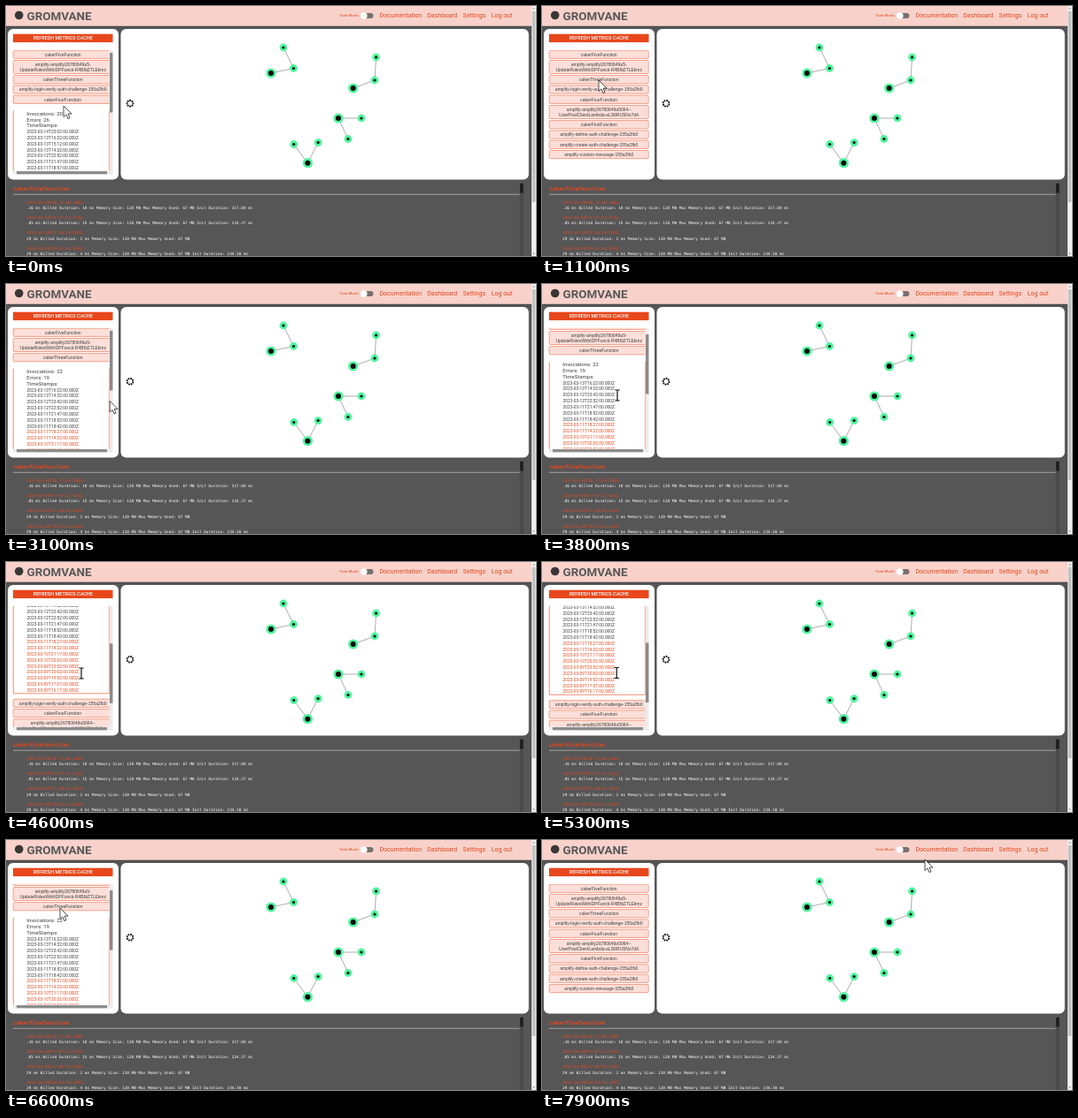
An HTML page for the animation above (8 s loop, 598 by 283 pixels).

```html
<!DOCTYPE html>
<html lang="en">
<head>
<meta charset="utf-8">
<title>Function metrics dashboard</title>
<style>
  html, body { margin: 0; width: 100%; height: 100%; overflow: hidden; background: #565657; }
  svg { display: block; width: 598px; height: 283px; font-family: Roboto, Arial, sans-serif; }
  text { white-space: pre; }
  .mono { font-family: "DejaVu Sans Mono", monospace; }
  .label { font-family: "Liberation Sans", Arial, sans-serif; }
</style>
</head>
<body>
<svg id="stage" viewBox="0 0 598 283"></svg>
<script>
const LOOP = 8000, STEP = 100;
const ORANGE = '#e8471b', INK = '#3c3c3e', GRAY = '#565657';
const stage = document.getElementById('stage');

function add(parent, tag, attrs = {}, content) {
  const node = document.createElementNS('http://www.w3.org/2000/svg', tag);
  for (const key in attrs) node.setAttribute(key, attrs[key]);
  if (content !== undefined) node.textContent = content;
  parent.appendChild(node);
  return node;
}
const rect = (parent, x, y, width, height, fill, more) =>
  add(parent, 'rect', { x, y, width, height, fill, ...more });
const circle = (parent, cx, cy, r, fill) => add(parent, 'circle', { cx, cy, r, fill });
const text = (parent, x, y, size, fill, content, more) =>
  add(parent, 'text', { x, y, 'font-size': size, fill, ...more }, content);
const line = (parent, x1, y1, x2, y2, stroke, width) =>
  add(parent, 'line', { x1, y1, x2, y2, stroke, 'stroke-width': width });
const centered = { 'text-anchor': 'middle' };

function drawHeader() {
  rect(stage, 0, 0, 593, 283, GRAY);
  rect(stage, 0, 22.5, 593, 1.5, '#47474a');
  rect(stage, 0, 0, 593, 22.7, '#f8d2ca');
  circle(stage, 14.7, 10.5, 4.8, '#3a3636');
  text(stage, 23.6, 16.3, 13.4, '#58585a', 'GROMVANE', { 'font-weight': 700 });
  text(stage, 376.5, 12.4, 4.4, ORANGE, 'Dark Mode');
  rect(stage, 401, 8, 13.5, 6, '#77706f', { rx: 3 });
  circle(stage, 403.8, 11, 3.8, '#fff');
  const links = [['Documentation', 445.3], ['Dashboard', 492.2], ['Settings', 528.3], ['Log out', 559.5]];
  for (const [name, x] of links) text(stage, x, 13.2, 7, ORANGE, name, centered);

  rect(stage, 593, 0, 5, 283, '#f1f1f1');
  rect(stage, 593.7, 6, 3.6, 216, '#c1c1c1');
  add(stage, 'path', { d: 'M594.3 3.6L595.5 2L596.7 3.6ZM594.3 279.4L595.5 281L596.7 279.4Z', fill: '#707070' });
}

function drawGraph() {
  rect(stage, 129.5, 26, 460.3, 170.5, '#fff', { rx: 6 });
  // each group: main node, then satellites; the link hub is the node at index hub
  const groups = [
    { hub: 1, at: [[299, 76], [324.5, 70.5], [313, 47]] },
    { hub: 1, at: [[391.7, 93], [416, 84], [417.6, 58]] },
    { hub: 0, at: [[375, 127], [401, 127], [386, 150.5]] },
    { hub: 0, at: [[340.4, 177.7], [324.8, 156.5], [352.2, 154.6]] }
  ];
  for (const { hub, at } of groups) {
    for (const p of at) line(stage, ...at[hub], ...p, '#a3a3a3', 0.9);
    at.forEach(([x, y], i) => {
      circle(stage, x, y, i ? 4.4 : 5.6, '#4ff59c');
      circle(stage, x, y, i ? 1.6 : 3, '#0a0a0a');
    });
  }
  const ring = add(stage, 'g');
  for (let i = 0; i < 8; i++) {
    const a = i * Math.PI / 4;
    circle(ring, 3.4 * Math.cos(a), 3.4 * Math.sin(a), 1.1, '#1c1c1c');
  }
  return ring;
}

function drawLog() {
  const mono = { class: 'mono' };
  text(stage, 8, 208.5, 6.2, ORANGE, 'cakerFiveFunction',
    { ...mono, 'font-weight': 700, 'font-style': 'italic' });
  line(stage, 8, 213.3, 580, 213.3, '#b5b5b5', 0.8);
  rect(stage, 579.7, 200, 4.2, 83, '#4b4b4d');
  rect(stage, 580, 201, 3.6, 10.5, '#1f1f20');
  const size = 'Memory Size: 128 MB Max Memory Used: 67 MB';
  const rows = [
    ['16:17:08.188', '.16 ms Billed Duration: 10 ms', ' Init Duration: 317.80 ms'],
    ['17:07:57.421', '.85 ms Billed Duration: 15 ms', ' Init Duration: 224.37 ms'],
    ['17:08:29.283', '29 ms Billed Duration: 2 ms', ''],
    ['19:52:34.495', '29 ms Billed Duration: 4 ms', ' Init Duration: 234.38 ms']
  ];
  rows.forEach(([time, billed, init], i) => {
    const y = 224 + i * 17.2;
    text(stage, 23, y, 4.38, ORANGE, `2023-03-09T${time}Z:`, mono);
    text(stage, 23, y + 6.1, 4.38, '#fff', `${billed} ${size}${init}`, mono);
  });
}

const buttons = [
  ['cakerFiveFunction'],
  ['amplify-amplify26780649a5-', 'UpdateRolesWithIDPFuncti-R4B6tZ7LEkmz'],
  ['cakerThreeFunction'],
  ['amplify-login-verify-auth-challenge-155a2fb0'],
  ['cakerFourFunction'],
  ['amplify-amplify26780649a5064--', 'UserPoolClientLambda-aLS6RUSNx7dA'],
  ['cakerFirstFunction'],
  ['amplify-login-define-auth-challenge-155a2fb0'.replace('login-', '')],
  ['amplify-login-create-auth-challenge-155a2fb0'.replace('login-', '')],
  ['amplify-login-custom-message-155a2fb0'.replace('login-', '')]
];
const details = {
  2: {
    calls: 22, errors: 19, fine: 7,
    times: '13T16:22 13T14:32 12T23:42 12T22:52 11T21:47 11T18:52 11T18:42 11T18:27 ' +
      '11T14:22 10T21:17 10T20:32 09T23:52 09T20:02 09T19:52 09T17:07 09T16:17'
  },
  4: {
    calls: 20, errors: 26, fine: 9,
    times: '14T23:02 13T16:22 13T15:12 13T14:32 12T22:52 11T21:47 11T18:57 11T18:42 ' +
      '11T18:27 11T14:22 10T21:17 10T20:32 09T23:52'
  }
};

function drawDetail(g, top, { calls, errors, fine, times }) {
  const stamps = times.split(' ');
  const heads = [`Invocations: ${calls}`, `Errors: ${errors}`, 'TimeStamps:'];
  heads.forEach((s, i) => text(g, 23.3, top + 5.2 + i * 6.9, 6, INK, s));
  stamps.forEach((s, i) =>
    text(g, 23.6, top + 25.8 + i * 6.82, 4.85, i < fine ? INK : ORANGE, `2023-03-${s}:00.000Z`));
  const bottom = top + 27.7 + (stamps.length - 1) * 6.82;
  add(g, 'path', { d: `M8.3 ${top}V${bottom}H116.4V${top}`, fill: 'none', stroke: '#ee7350', 'stroke-width': 0.8 });
  return bottom + 6.4;
}

function drawList(parent, open) {
  const g = add(parent, 'g');
  let y = 50.2;
  buttons.forEach((lines, i) => {
    const h = lines.length > 1 ? 15 : 9.2;
    rect(g, 8.2, y, 112, h, '#fbdfd8', { rx: 1, stroke: '#ee7f60', 'stroke-width': 0.7 });
    lines.forEach((s, n) =>
      text(g, 64.2, y + 6.3 + n * 5.8, 5, INK, s, { ...centered, class: 'label' }));
    y += h + 2.1;
    if (i === open) y = drawDetail(g, y + 5.9, details[i]);
  });
  return g;
}

function drawPanel() {
  rect(stage, 2, 26, 125, 170.5, '#fff', { rx: 6 });
  rect(stage, 8, 31.7, 112.5, 9.4, ORANGE);
  text(stage, 64.3, 38.4, 5.5, '#fff', 'REFRESH METRICS CACHE', { ...centered, 'font-weight': 500 });

  const defs = add(stage, 'defs');
  for (const [id, width, height] of [['narrow', 109.8, 137], ['wide', 114, 142]]) {
    rect(add(defs, 'clipPath', { id }), 7, 49.7, width, height, '#000');
  }
  const views = {};
  for (const open of [-1, 2, 4]) {
    const frame = add(stage, 'g', { 'clip-path': `url(#${open < 0 ? 'wide' : 'narrow'})` });
    views[open] = { frame, list: drawList(frame, open) };
  }
  const bars = add(stage, 'g');
  rect(bars, 116.8, 49.7, 3.8, 137, '#ececec');
  rect(bars, 8, 186.8, 112.6, 3.8, '#ececec');
  rect(bars, 12, 187.1, 102, 3.2, '#8a8a8a');
  const thumb = rect(bars, 117, 53, 3.4, 67.5, '#8a8a8a');
  return { views, bars, thumb };
}

function drawPointers() {
  const arrow = add(stage, 'path', {
    d: 'M0 0V12.6L2.9 9.9L4.9 14.6L7 13.7L5 9.1H9Z',
    fill: '#fff', stroke: '#222', 'stroke-width': 0.8, 'stroke-linejoin': 'round'
  });
  const beam = add(stage, 'path', {
    d: 'M-2.7 -6H-0.8L0 -5.3L0.8 -6H2.7M0 -5.3V5.3M-2.7 6H-0.8L0 5.3L0.8 6H2.7',
    fill: 'none', stroke: '#111', 'stroke-width': 1.2
  });
  return { arrow, beam };
}

drawHeader();
const ring = drawGraph();
drawLog();
const panel = drawPanel();
const pointer = drawPointers();

// rows of [time, values...]
const pointerPath = [
  [0, 65, 113], [400, 64, 106], [700, 64, 106], [1000, 64, 84], [1400, 64, 84],
  [2100, 339.5, 177], [2400, 339.5, 177], [3300, 85, 126], [5000, 85, 126],
  [5700, 83, 124.7], [6000, 83, 124.7], [6500, 61, 77], [7000, 61, 77], [7700, 432, 22], [8000, 432, 22]
];
const scrollPath = [[0, 0], [3300, 0], [3600, 8], [3900, 8], [4600, 77], [5200, 77], [5700, 63], [5900, 63], [6500, 8], [8000, 8]];
const openPath = [[0, 4], [700, -1], [1300, 2], [7000, -1]];

function sample(path, t) {
  const i = path.findIndex(row => row[0] > t);
  const [a, b] = [path[i - 1], path[i]];
  const p = (t - a[0]) / (b[0] - a[0]);
  const k = p * p * (3 - 2 * p);
  return a.slice(1).map((v, n) => v + (b[n + 1] - v) * k);
}
const show = (node, on) => node.setAttribute('visibility', on ? 'visible' : 'hidden');

function render(t) {
  const open = openPath.filter(row => row[0] <= t).pop()[1];
  const scroll = open < 0 ? 0 : sample(scrollPath, t)[0];
  for (const key in panel.views) show(panel.views[key].frame, Number(key) === open);
  panel.views[open].list.setAttribute('transform', `translate(0 ${-scroll})`);
  show(panel.bars, open >= 0);
  panel.thumb.setAttribute('y', 53 + scroll * 0.51);

  ring.setAttribute('transform', `translate(140 110.3) rotate(${t * 0.18})`);

  const [x, y] = sample(pointerPath, t);
  const overText = t >= 3200 && t < 6200;
  show(pointer.arrow, !overText);
  show(pointer.beam, overText);
  for (const node of Object.values(pointer)) node.setAttribute('transform', `translate(${x} ${y})`);
}

const start = performance.now();
function tick() {
  const t = (performance.now() - start) % LOOP;
  render(Math.floor(t / STEP) * STEP);
  requestAnimationFrame(tick);
}
tick();
</script>
</body>
</html>
```
